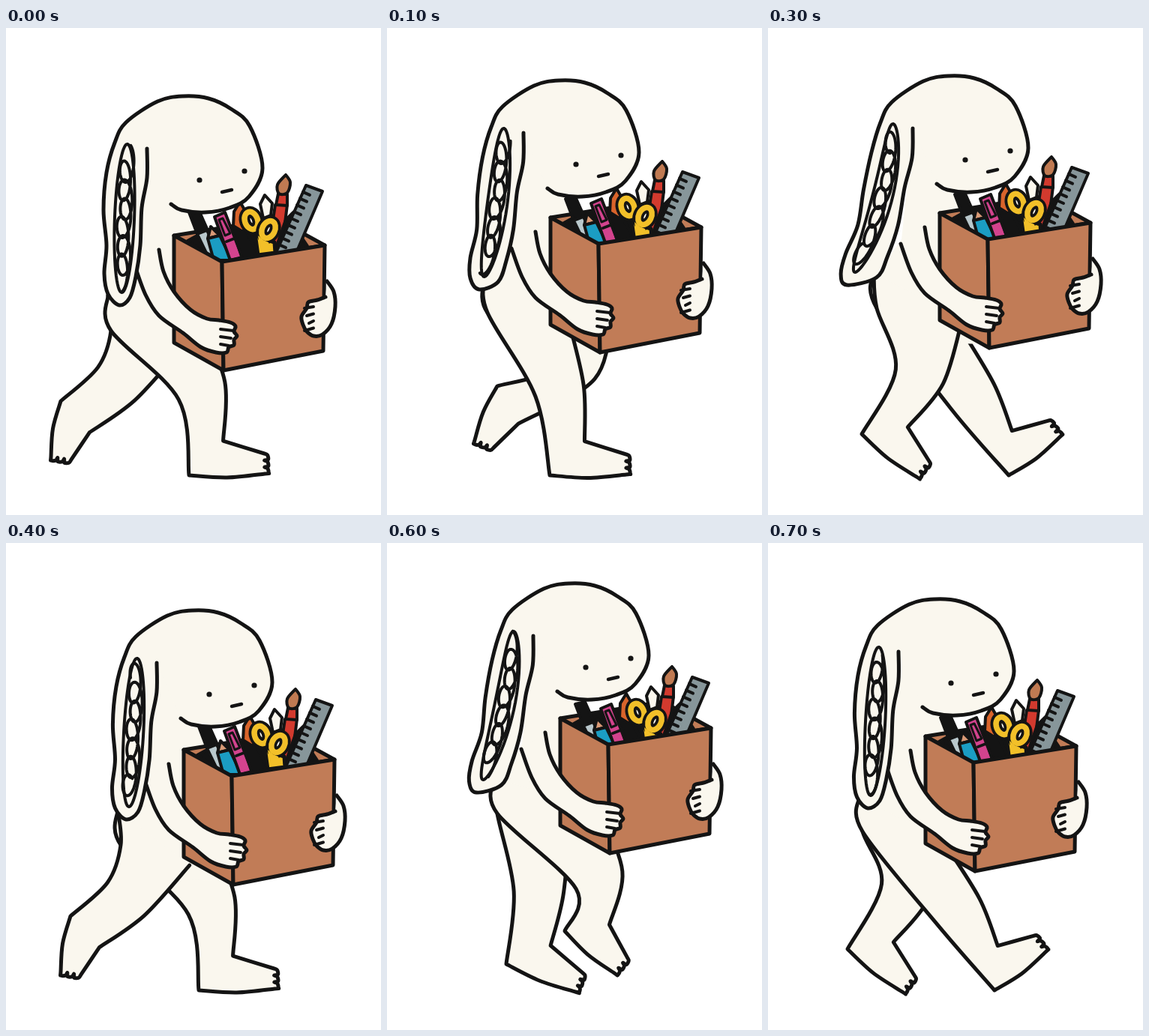
Animation, 500 px wide and 650 px high, one loop 0.8 s. Source, as an HTML page with a canvas:

```html
<!DOCTYPE html>
<html lang="en">
<head>
<meta charset="utf-8">
<title>Carrying a box</title>
<style>
html, body { margin: 0; width: 100%; height: 100%; overflow: hidden; background: #fff; }
canvas { display: block; }
</style>
</head>
<body>
<canvas id="stage" width="500" height="650"></canvas>
<script>
const ctx = document.getElementById('stage').getContext('2d');
const INK = '#141414', SKIN = '#faf7ee', CARD = '#c17c57';
const YELLOW = '#f2c029', RED = '#d23a2e', CLAY = '#c07a52';
const STEP = 100;

// Front top corner of the box on each step, and how far the ear swings out.
const BODY = [
  [288, 312, 0], [282, 288, 22], [285, 269, 40], [293, 282, 51],
  [301, 311, 4], [299, 287, 24], [295, 269, 39], [274, 293, 4]
];

// One leg through the walk: knee, heel and toe. x counts from the box corner.
// The far leg is half a cycle behind the near one.
const GAIT = [
  [-27, 484, -44, 597, 57, 595],
  [-52, 484, -65, 597, 37, 596],
  [-93, 468, -136, 562, -44, 599],
  [-91, 465, -168, 542, -95, 599],
  [-141, 475, -215, 498, -228, 572],
  [-37, 460, -135, 478, -165, 550],
  [-12, 450, -58, 518, 8, 574],
  [-20, 492, 28, 597, 96, 546]
];

function points(text) {
  const n = text.split(' ').map(Number), pts = [];
  for (let i = 0; i < n.length; i += 2) pts.push([n[i], n[i + 1]]);
  return pts;
}

const add = (p, q, k = 1) => [p[0] + q[0] * k, p[1] + q[1] * k];
const mid = (p, q) => [(p[0] + q[0]) / 2, (p[1] + q[1]) / 2];
function unit(p, q) {
  const x = q[0] - p[0], y = q[1] - p[1], d = Math.hypot(x, y);
  return [x / d, y / d];
}

function paint(fill, width) {
  if (fill) { ctx.fillStyle = fill; ctx.fill(); }
  if (width) { ctx.lineWidth = width; ctx.strokeStyle = INK; ctx.stroke(); }
}

// Smooth runs of points, with a corner where one run meets the next.
function shape(runs, fill = SKIN, width = 5) {
  let last = null;
  ctx.beginPath();
  for (const run of runs) {
    const p = last ? [last, ...run] : run;
    if (!last) ctx.moveTo(...p[0]);
    for (let i = 0; i < p.length - 1; i++) {
      const a = p[i - 1] || p[i], b = p[i], c = p[i + 1], d = p[i + 2] || c;
      ctx.bezierCurveTo(b[0] + (c[0] - a[0]) / 6, b[1] + (c[1] - a[1]) / 6,
        c[0] - (d[0] - b[0]) / 6, c[1] - (d[1] - b[1]) / 6, c[0], c[1]);
    }
    last = p[p.length - 1];
  }
  paint(fill, width);
}

function poly(pts, fill, width = 4) {
  ctx.beginPath();
  pts.forEach(p => ctx.lineTo(...p));
  ctx.closePath();
  paint(fill, width);
}

const flat = (text, fill, width) => poly(points(text), fill, width);

function line(x1, y1, x2, y2, width = 4) {
  ctx.beginPath();
  ctx.moveTo(x1, y1);
  ctx.lineTo(x2, y2);
  paint(null, width);
}

function at(x, y, draw) {
  ctx.save();
  ctx.translate(x, y);
  draw();
  ctx.restore();
}

function leg(x, y, [kx, ky, hx, hy, tx, ty]) {
  const knee = [x + kx, ky], heel = [x + hx, hy], toe = [x + tx, ty];
  const along = unit(heel, toe), up = [along[1], -along[0]];
  const sole = Math.hypot(tx - hx, ty - hy);
  const instep = add(add(heel, along, sole * 0.46), up, 45);
  const down = unit([x - 88, y + 88], mid(heel, instep));
  const front = [down[1], -down[0]];
  const kneeFront = add(knee, front, 33);

  const toes = [toe];
  for (let i = 0; i < 3; i++) {
    const base = add(toe, up, i * 9);
    toes.push(add(add(base, up, 1), along, 5), add(add(base, up, 7), along, 4), add(base, up, 9));
  }
  shape([
    [[x - 152, y + 45], [x - 148, y + 92], add(knee, front, -33), heel],
    [add(mid(heel, toe), up, -4), ...toes],
    [instep],
    [kneeFront, add(kneeFront, down, -90)]
  ]);
}

function ring(x, y, tilt) {
  ctx.beginPath();
  ctx.ellipse(x, y, 8.5, 12, tilt, 0, 7);
  paint(SKIN, 15);
  ctx.lineWidth = 7.5;
  ctx.strokeStyle = YELLOW;
  ctx.stroke();
}

function tools() {
  flat('243 246 256 243 268 270 254 275', INK);
  flat('254 275 267 270 282 304 268 304', '#b9c8cc');
  flat('272 265 268 281 284 277', '#d99a76');
  flat('268 281 284 277 300 310 276 310', '#1b9dc3');
  flat('311 232 303 245 302 264 318 274 319 246', '#d9642b');
  flat('277 252 291 246 314 306 298 310', '#d3438e');
  flat('283 256 288 254 298 274 291 277', '#d3438e', 3);
  line(293, 285, 306, 280);
  flat('305 280 318 268 336 304 314 308', INK);
  flat('344 223 338 235 342 254 352 250 354 234', SKIN);
  flat('358 236 374 236 366 300 348 302', RED);
  flat('362 221 374 222 374 237 359 236', RED);
  shape([points('372 196 378 206 374 220 363 221 361 209 372 196')], CLAY, 4);
  flat('372 256 382 246 364 302 356 302', INK);

  flat('399 210 421 218 386 300 358 302', '#87969a');
  for (let i = 1; i < 10; i++) {
    const x = 399 - 4 * i, y = 210 + 8.8 * i;
    line(x, y, x + 9, y + 4, 4);
  }

  flat('331 274 344 282 357 286 358 300 335 303', YELLOW, 5);
  ring(326, 257, -0.35);
  ring(349, 269, 0.45);
  flat('335 277 342 283 349 286 352 296 338 298', YELLOW, 0);
}

function box(sink) {
  const left = [-64, -35], front = [0, 0], right = [137, -22], low = [2, 145];
  poly([left, add(left, right), right, front], CARD, 5);
  flat('-46 -28 -26 -39 62 -53 104 -36 114 -21 0 -1', INK);
  at(-287, sink - 312, tools);
  poly([left, front, low, [-64, 108]], CARD, 5);
  poly([front, right, [135, 119], low], CARD, 5);
}

function farHand() {
  shape([points('3 48 12 62 14 82 9 105 -3 119 -15 121 -24 115 -29 106 -31 95 -24 84 -22 76 -10 73 1 69')]);
  for (let i = 0; i < 4; i++) line(-27 + 3 * (i % 3), 84 + 10 * i, -15, 82 + 9.5 * i);
}

function arm() {
  shape([points('-116 6 -102 44 -84 72 -52 95 -28 114 -8 121 6 121 9 114 16 111 16 104 20 99 16 93 18 86 11 81 -4 78 -20 76 -42 64 -64 40 -78 13 -84 -16')]);
  for (let i = 0; i < 3; i++) line(-2, 90 + 10 * i, 15 - 3 * i, 92 + 10 * i);
}

// Everything on the head counts from the near eye.
function fur(swing, seed) {
  const spot = (t, side) =>
    ctx.lineTo(-96 - 8 * t - 0.85 * swing * t * t + side, -48 + 198 * t + side * 0.2);
  ctx.beginPath();
  for (let s = 0; s < 6.4; s += 0.1) spot((1 - Math.cos(s)) / 2, 13 * Math.sin(s));
  paint(null, 4);
  ctx.beginPath();
  for (let t = 0.1; t < 0.9; t += 0.003) {
    const turn = 2 * Math.PI * 8 * t + seed;
    spot(t + 0.1 * Math.sin(turn), 8 * Math.cos(turn) + 2 * Math.sin(turn * 0.37));
  }
  paint(null, 4);
}

function head(swing, seed) {
  const skull = points('-38 32 -24 40 8 43 40 37 66 22 84 -16 67 -72 42 -95 12 -109 -22 -112 -56 -105 -98 -77 -113 -50');
  const back = points('-124 -10 -128 40 -124 87 -127 125 -122 152 -107 167');
  const inner = points('-93 157 -85 129 -79 87 -77 37 -70 -3 -70 -42');
  const sway = share => ([x, y]) => [x - swing * share * ((y + 40) / 207) ** 2, y];
  shape([[...skull, ...back.map(sway(1)), ...inner.map(sway(0.55))]]);
  fur(swing, seed);

  for (const [x, y] of [[0, 0], [60, -12]]) {
    ctx.beginPath();
    ctx.arc(x, y, 3.6, 0, 7);
    paint(INK);
  }
  line(30, 16, 43, 13, 4.5);
}

function draw(i) {
  const [x, y, swing] = BODY[i];
  const sink = 6 - 6 * Math.cos(i * Math.PI / 2); // contents lag behind each bounce

  ctx.fillStyle = '#fff';
  ctx.fillRect(0, 0, 500, 650);
  ctx.lineCap = ctx.lineJoin = 'round';

  leg(x, y, GAIT[(i + 4) % 8]);
  at(x, y, () => flat('-98 -160 -48 -72 0 0 0 140 -80 138 -143 92 -150 50 -115 0', SKIN, 0));
  leg(x, y, GAIT[i]);
  at(x, y, () => box(sink));
  at(x + 137, y - 22, farHand);
  at(x, y, arm);
  at(x - 30, y - 109 + sink / 2, () => head(swing, i));
}

const start = performance.now();
function tick() {
  draw(Math.floor((performance.now() - start) / STEP) % BODY.length);
  requestAnimationFrame(tick);
}
tick();
</script>
</body>
</html>
```
